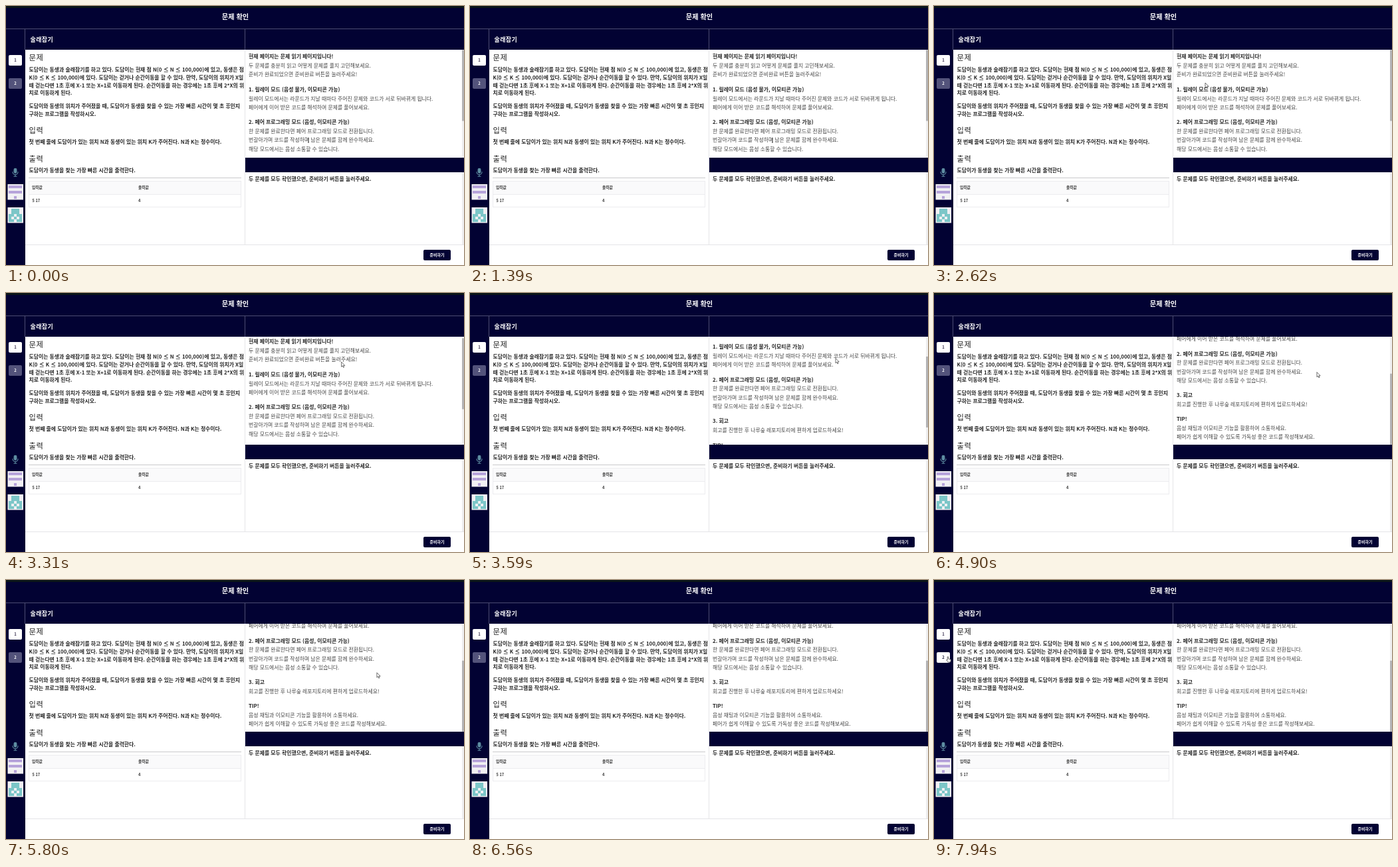
An HTML page that plays this animation: 689x391 px, repeating every 8000 ms.

```html
<!DOCTYPE html>
<html lang="ko">
<head>
<meta charset="utf-8">
<title>문제 확인</title>
<style>
  html, body { margin: 0; width: 100%; height: 100%; overflow: hidden; background: #fff; }
  svg { display: block; }
  text { font: 400 7.87px "Noto Sans CJK KR", "Noto Sans CJK", "Noto Sans", sans-serif; fill: #444; white-space: pre; }
  .bold { font-weight: 700; fill: #262626; }
  .heading { font-size: 11.3px; font-weight: 500; letter-spacing: .5px; fill: #222; }
  .page { font-size: 10.2px; font-weight: 700; fill: #fff; text-anchor: middle; }
  .title { font-size: 9px; font-weight: 700; letter-spacing: .4px; fill: #fff; }
  .cell { font-size: 5.7px; font-weight: 700; fill: #333; }
  .tab { font-size: 6px; font-weight: 700; text-anchor: middle; fill: #39304f; }
  .ready { font-size: 6px; font-weight: 700; text-anchor: middle; fill: #fff; }
</style>
</head>
<body>
<svg id="stage" width="689" height="391" viewBox="0 0 689 391">
  <rect width="689" height="391" fill="#fff"/>
  <path d="M0 0H689V66H29V391H0Z M360 229H689V251H360Z" fill="#020233"/>
  <rect width="689" height="3" fill="#0b1618"/>
  <path d="M0 34.5H689 M28.5 35V66 M359.5 35V66" stroke="#4c4c70" fill="none"/>
  <path d="M359.5 66V360 M29 360.5H689" stroke="#e5e5e8" fill="none"/>

  <svg x="360" y="66" width="326" height="163" viewBox="360 66 326 163">
    <g id="guide"></g>
  </svg>
  <path d="M686 66h3v163h-3z M686 251h3v109h-3z" fill="#eeeeef"/>
  <rect id="thumb" x="686" y="67" width="3" height="107" fill="#b4b4b6"/>

  <path d="M34 259.5H354" stroke="#c9c9cb"/>
  <rect x="34.5" y="264.5" width="319" height="39" fill="#fff" stroke="#ececef"/>
  <rect x="35" y="265" width="318" height="19" fill="#fafafb"/>
  <path d="M35 284.5H353" stroke="#ececef"/>

  <rect x="4" y="74" width="20" height="16" rx="2" fill="#fff"/>
  <rect id="tab2" x="4" y="109" width="20" height="16" rx="2"/>
  <rect x="628" y="368" width="41" height="16" rx="2" fill="#020233"/>

  <g fill="none" stroke="#5f8fa3" stroke-width="1.1" stroke-linecap="round">
    <rect x="12.1" y="245.2" width="3.8" height="7" rx="1.9" fill="#5f8fa3"/>
    <path d="M10 250.5a4 4 0 0 0 8 0 M14 254.6V257 M12 257.2H16"/>
  </g>
  <g id="avatars"></g>
  <g id="labels"></g>

  <g id="cursor">
    <path id="arrow" d="M0 0V7.3L1.7 5.8L2.9 8.4L4 7.9L2.9 5.4H5.2Z" fill="#fff" stroke="#333" stroke-width=".7"/>
    <path id="beam" d="M-1 -3H1 M0 -3V3 M-1 3H1" fill="none" stroke="#333" stroke-width=".8"/>
    <path id="hand" d="M-.8 0q.8-.9 1.5 0V3l3 .8q.8.3.7 1.2L3.8 8H0L-2.3 4.8q.2-1 1.5-.1Z" fill="#fff" stroke="#333" stroke-width=".7"/>
  </g>
</svg>
<script>
const LOOP = 8000;
const $ = id => document.getElementById(id);

function add(parent, tag, attrs, content = '') {
  const node = document.createElementNS('http://www.w3.org/2000/svg', tag);
  for (const key in attrs) node.setAttribute(key, attrs[key]);
  node.textContent = content;
  return parent.appendChild(node);
}

// Text is placed by its vertical centre.
function label(parent, x, middle, content, kind = '') {
  const size = { heading: 11.3, page: 10.2, title: 9, cell: 5.7, tab: 6, ready: 6 }[kind] || 7.87;
  return add(parent, 'text', { x, y: middle + size * .37, class: kind }, content);
}

const labels = $('labels');
label(labels, 345, 16.5, '문제 확인', 'page');
label(labels, 36.5, 50.5, '술래잡기', 'title');
[[78, '문제'], [187.5, '입력'], [230.5, '출력']]
  .forEach(([y, s]) => label(labels, 34.5, y, s, 'heading'));
[
  [96, '도담이는 동생과 술래잡기를 하고 있다. 도담이는 현재 점 N(0 ≤ N ≤ 100,000)에 있고, 동생은 점'],
  [107.8, 'K(0 ≤ K ≤ 100,000)에 있다. 도담이는 걷거나 순간이동을 할 수 있다. 만약, 도담이의 위치가 X일'],
  [119.6, '때 걷는다면 1초 후에 X-1 또는 X+1로 이동하게 된다. 순간이동을 하는 경우에는 1초 후에 2*X의 위'],
  [131.4, '치로 이동하게 된다.'],
  [151.3, '도담이와 동생의 위치가 주어졌을 때, 도담이가 동생을 찾을 수 있는 가장 빠른 시간이 몇 초 후인지'],
  [163.1, '구하는 프로그램을 작성하시오.'],
  [205.5, '첫 번째 줄에 도담이가 있는 위치 N과 동생이 있는 위치 K가 주어진다. N과 K는 정수이다.'],
  [248.5, '도담이가 동생을 찾는 가장 빠른 시간을 출력한다.']
].forEach(([y, s]) => label(labels, 34.5, y, s, 'bold'));
[[39, 274, '입력값'], [199, 274, '출력값'], [39.5, 293.5, '5 17'], [199, 293.5, '4']]
  .forEach(([x, y, s]) => label(labels, x, y, s, 'cell'));
label(labels, 365, 261, '두 문제를 모두 확인했으면, 준비하기 버튼을 눌러주세요.', 'bold');
label(labels, 648.5, 376, '준비하기', 'ready');
label(labels, 14, 81.5, '1', 'tab');
const tabNumber = label(labels, 14, 116.5, '2', 'tab');

const guide = $('guide');
[
  [76, '현재 페이지는 문제 읽기 페이지입니다!', '두 문제를 충분히 읽고 어떻게 문제를 풀지 고민해보세요.', '준비가 완료되었으면 준비완료 버튼을 눌러주세요!'],
  [126, '1. 릴레이 모드 (음성 불가, 이모티콘 가능)', '릴레이 모드에서는 라운드가 지날 때마다 주어진 문제와 코드가 서로 뒤바뀌게 됩니다.', '페어에게 이어 받은 코드를 해석하여 문제를 풀어보세요.'],
  [175.3, '2. 페어 프로그래밍 모드 (음성, 이모티콘 가능)', '한 문제를 완료한다면 페어 프로그래밍 모드로 전환됩니다.', '번갈아가며 코드를 작성하며 남은 문제를 함께 완수하세요.', '해당 모드에서는 음성 소통할 수 있습니다.'],
  [238, '3. 회고', '회고를 진행한 후 나루숲 레포지토리에 편하게 업로드하세요!'],
  [274.2, 'TIP!', '음성 채팅과 이모티콘 기능을 활용하여 소통하세요.', '페어가 쉽게 이해할 수 있도록 가독성 좋은 코드를 작성해보세요.']
].forEach(([top, head, ...lines]) => {
  label(guide, 365, top, head, 'bold');
  lines.forEach((line, i) => label(guide, 365, top + 13.7 + i * 13.3, line));
});

function avatar(top, color, rows) {
  add($('avatars'), 'rect', { x: 2.5, y: top, width: 23.5, height: 23.5, fill: '#f1f0f3' });
  rows.forEach((row, r) => [...row].forEach((c, i) => {
    if (c === 'x') add($('avatars'), 'rect', { x: 4 + i * 4, y: top + 2 + r * 4, width: 4.05, height: 4.05, fill: color });
  }));
}
avatar(269, '#b6a3da', ['xxxxx', '.....', 'xxxxx', '.....', '..x..']);
avatar(304, '#7cc6c8', ['.xxx.', '.xxx.', 'xx.xx', 'x.x.x', 'xx.xx']);

// Tables of [time, ...values], eased between neighbours.
const scrollSteps = [[0, 0], [3280, 0], [3480, 44.6], [4700, 44.6], [4890, 83.7]];
const cursorSteps = [
  [0, 455, 203], [1500, 455, 203], [2500, 408, 116], [2900, 408, 116],
  [3560, 550, 98.5], [3900, 550, 98.5], [4800, 576, 119.5], [5500, 576, 119.5],
  [6100, 540, 160], [7200, 540, 160], [7800, 21, 116]
];
const shapes = [[0, 'beam'], [1900, 'arrow'], [6000, ''], [7300, 'arrow'], [7760, 'hand']];

function sample(steps, t) {
  const next = steps.findIndex(step => step[0] > t);
  if (next < 0) return steps[steps.length - 1].slice(1);
  const a = steps[next - 1], b = steps[next];
  const p = (t - a[0]) / (b[0] - a[0]);
  const eased = p * p * (3 - 2 * p);
  return a.slice(1).map((v, i) => v + (b[i + 1] - v) * eased);
}

function draw(t) {
  const [scroll] = sample(scrollSteps, t);
  guide.setAttribute('transform', `translate(0 ${-scroll})`);
  $('thumb').setAttribute('y', 66.5 + scroll * .66);

  const [x, y] = sample(cursorSteps, t);
  $('cursor').setAttribute('transform', `translate(${x} ${y})`);
  const shape = shapes.filter(s => s[0] <= t).pop()[1];
  for (const id of ['arrow', 'beam', 'hand']) $(id).style.display = id === shape ? '' : 'none';

  const active = t >= 7760;
  $('tab2').setAttribute('fill', active ? '#fff' : '#53537b');
  tabNumber.style.fill = active ? '#20203f' : '#fff';
}

const start = performance.now();
function tick() {
  draw((performance.now() - start) % LOOP);
  requestAnimationFrame(tick);
}
tick();
</script>
</body>
</html>
```
